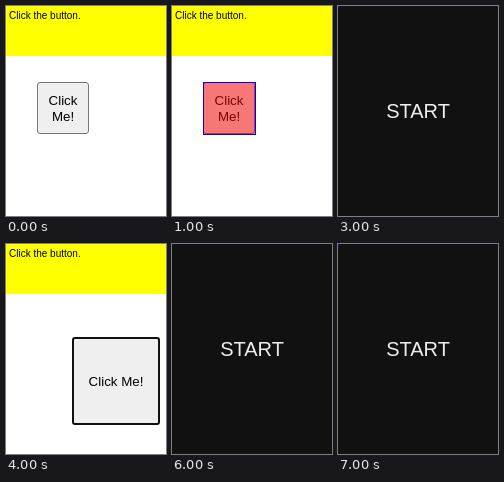
Animation of 160 by 210 pixels, one loop 8000 ms. Source, as an HTML page:

```html
<!DOCTYPE html>
<html lang="en">
<head>
<meta charset="utf-8">
<title>Click the button</title>
<style>
  html, body { margin: 0; width: 100%; height: 100%; overflow: hidden; background: #fff; }
  div { position: absolute; box-sizing: border-box; }
  p { position: absolute; margin: 0; width: 100%; text-align: center; white-space: nowrap; }
  #stage { left: 0; top: 0; width: 160px; height: 210px; overflow: hidden;
    font-family: Arial, "Liberation Sans", sans-serif; color: #000; }
  #bar { width: 160px; height: 50px; background: #ff0; }
  #bar p { left: 3px; top: 4px; text-align: left; font-size: 10px; line-height: 11px; }
  .button { background: #efefef; border-radius: 3px; font-size: 13.333px; line-height: 15px; }
  #small { left: 31px; top: 76px; width: 52px; height: 52px; border: 1px solid #767676; }
  #large { left: 66px; top: 93px; width: 88px; height: 88px; border: 2px solid #101010; }
  #mark { background: rgba(255, 0, 0, .5); background-clip: padding-box; border: 1px solid #00f; }
  #start { width: 160px; height: 210px; background: #111; color: #eee; }
  #start p { top: 94px; font-size: 20px; line-height: 22px; }
  #corner { width: 1px; height: 2px; background: #00f; }
</style>
</head>
<body>
<div id="stage">
  <div id="bar"><p>Click the button.</p></div>
  <div id="small" class="button"><p style="top:10px">Click</p><p style="top:26px">Me!</p></div>
  <div id="large" class="button"><p style="top:35px">Click Me!</p></div>
  <div id="mark"></div>
  <div id="start"><p>START</p><div id="corner"></div></div>
</div>
<script>
  const el = id => document.getElementById(id);
  const show = (id, on) => { el(id).style.display = on ? 'block' : 'none'; };
  const STEP = 1000, STEPS = 8;
  const boxes = [[31, 76, 53], [66, 93, 89]];

  function draw(ms) {
    const step = Math.floor(ms / STEP) % STEPS;
    const round = step >> 2;
    const phase = step % 4;
    const [x, y, size] = boxes[round];
    Object.assign(el('mark').style, {
      left: x + 'px', top: y + 'px', width: size + 'px', height: size + 'px'
    });
    show('small', round === 0);
    show('large', round === 1);
    show('mark', phase === 1);
    show('start', phase > 1);
    show('corner', phase === 3);
  }

  let began;
  function tick(now) {
    began ??= now;
    draw(now - began);
    requestAnimationFrame(tick);
  }
  draw(0);
  requestAnimationFrame(tick);
</script>
</body>
</html>
```
